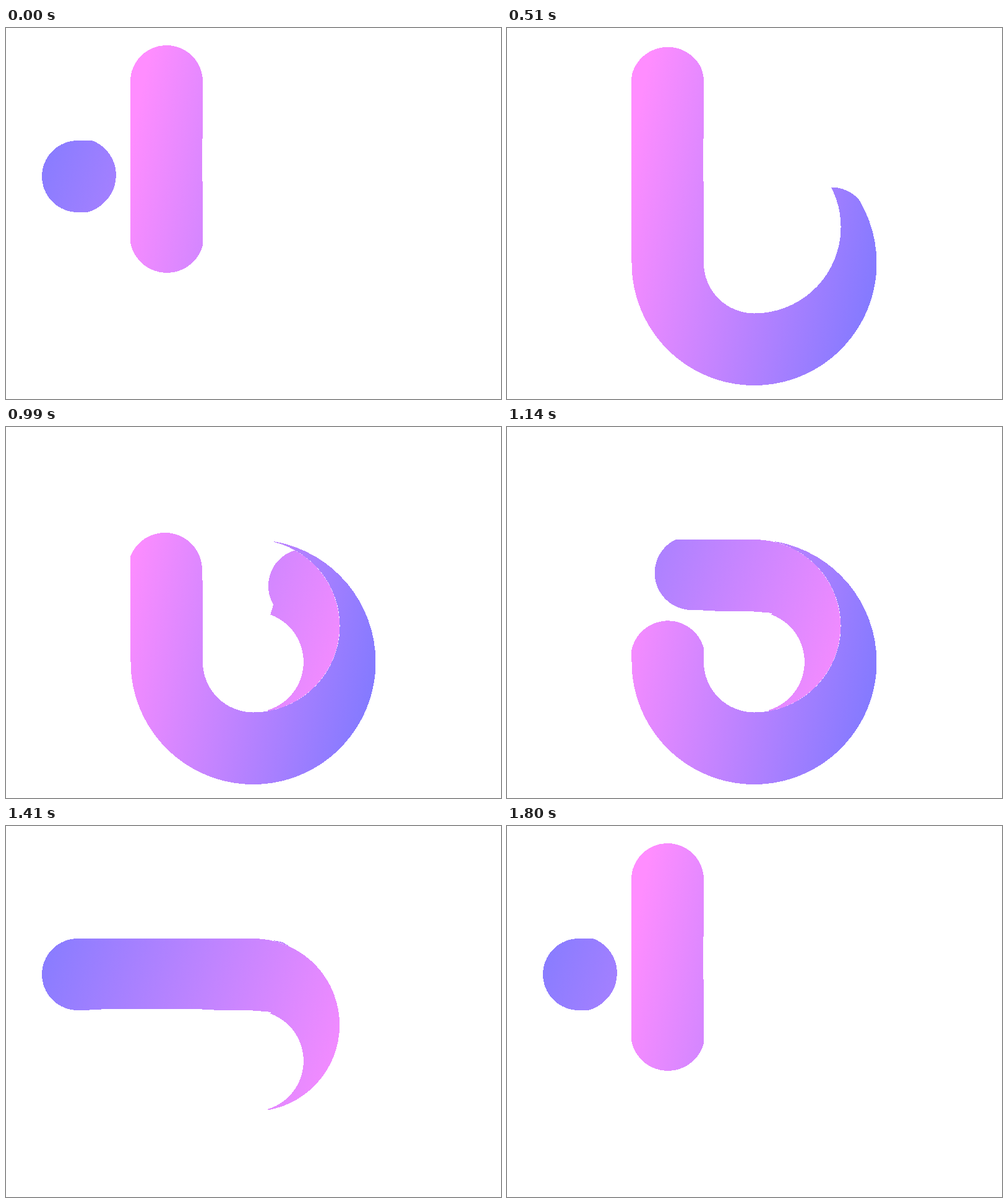
Recreate the animation shown at these times as an HTML page. Size 800 by 600 pixels, loop 1830 ms.

```html
<!DOCTYPE html>
<html lang="en">
<head>
<meta charset="utf-8">
<title>Ribbon loop</title>
<style>
  html, body { margin: 0; width: 100%; height: 100%; overflow: hidden; background: #fff; }
  svg { display: block; width: 100vw; height: 100vh; }
  .trim { fill: none; stroke: #fff; stroke-width: 120; stroke-linecap: round; stroke-linejoin: round; }
</style>
</head>
<body>
<svg viewBox="0 0 800 600" shape-rendering="crispEdges">
  <defs>
    <linearGradient id="stemFill" gradientUnits="userSpaceOnUse" x1="221" y1="90" x2="643" y2="183">
      <stop offset="0" stop-color="#ff8dff"/>
      <stop offset="1" stop-color="#857aff"/>
    </linearGradient>
    <linearGradient id="barFill" gradientUnits="userSpaceOnUse" x1="60" y1="200" x2="595" y2="395">
      <stop offset="0" stop-color="#887cff"/>
      <stop offset="1" stop-color="#ff8dff"/>
    </linearGradient>
    <mask id="stemMask" maskUnits="userSpaceOnUse" x="0" y="0" width="800" height="600">
      <path id="stemTrim" class="trim" d="M260 86L258 130L257 231L260 336V380A139.5 139.5 0 1 0 399.5 240.5"/>
    </mask>
    <mask id="barMask" maskUnits="userSpaceOnUse" x="0" y="0" width="800" height="600">
      <path id="barTrim" class="trim" d="M410 452L424 433C455 405 480 340 487 313C493 295 496 275 485 258
        C473 246 440 239 400 240L370 239C340 238 320 236 300 236H170C150 236 135 238 118 238L116 240"/>
    </mask>
  </defs>
  <g mask="url(#barMask)">
    <path fill="url(#barFill)" d="M116 182H399.5A139.75 139.75 0 0 1 423 459.5V458
      A81.5 81.5 0 0 0 399.5 298.5L116 298A58 58 0 0 1 116 182Z"/>
  </g>
  <g mask="url(#stemMask)">
    <path fill="url(#stemFill)" d="M201 86.5A58.5 58.5 0 0 1 318 86.5V380A81.5 81.5 0 0 0 399.5 461.5
      A139.75 139.75 0 0 0 433 186V185A198 198 0 0 1 597.5 380A198 198 0 0 1 201.5 380L201 370Z"/>
  </g>
</svg>
<script>
const STEP = 30, FRAMES = 61, CYCLE = 60;

// Monotone cubic through [frame, distance] keys
function curve(keys) {
  const last = keys.length - 1;
  const slope = i => (keys[i + 1][1] - keys[i][1]) / (keys[i + 1][0] - keys[i][0]);
  const tangent = i => {
    if (i === 0) return slope(0);
    if (i === last) return slope(last - 1);
    const a = slope(i - 1), b = slope(i);
    return a * b > 0 ? 2 * a * b / (a + b) : 0;
  };
  return x => {
    if (x <= keys[0][0]) return keys[0][1];
    if (x >= keys[last][0]) return keys[last][1];
    const i = keys.findIndex(k => k[0] > x) - 1;
    const [x0, y0] = keys[i], [x1, y1] = keys[i + 1];
    const w = x1 - x0, t = (x - x0) / w, r = 1 - t;
    return y0 * (1 + 2 * t) * r * r + tangent(i) * w * t * r * r
         + y1 * t * t * (3 - 2 * t) - tangent(i + 1) * w * t * t * r;
  };
}

// Negative distances count back from the end of the path; null is the end itself
function ribbon(id, headKeys, tailKeys) {
  const path = document.getElementById(id);
  const length = path.getTotalLength();
  const resolve = keys => curve(keys.map(([f, d]) => [f, d === null ? length : d < 0 ? length + d : d]));
  const head = resolve(headKeys), tail = resolve(tailKeys);
  return frame => {
    const from = tail(frame), to = head(frame);
    path.style.display = to - from > 0.01 ? "" : "none";
    path.setAttribute("stroke-dasharray", `${Math.max(0, to - from)} 9999`);
    path.setAttribute("stroke-dashoffset", -from);
  };
}

const drawStem = ribbon("stemTrim",
  [[-7, 0], [-6, 19], [0, 250], [10, 578], [22, null]],
  [[14, 0], [18, 7], [25, 44], [33, 145], [42, 467], [47, -22], [47.3, null]]);
const drawBar = ribbon("barTrim",
  [[23.5, 0], [25, 23.6], [33, -372], [42, -50], [45, null]],
  [[48, 0], [51, -385], [54, -171], [57, -48], [60, -2.8], [61, null]]);

function render(ms) {
  const frame = Math.floor(ms / STEP) % FRAMES;
  drawStem(frame < 50 ? frame : frame - CYCLE);
  drawBar(frame < 10 ? frame + CYCLE : frame);
}

const start = performance.now();
function tick() {
  render(performance.now() - start);
  requestAnimationFrame(tick);
}
tick();
</script>
</body>
</html>
```
